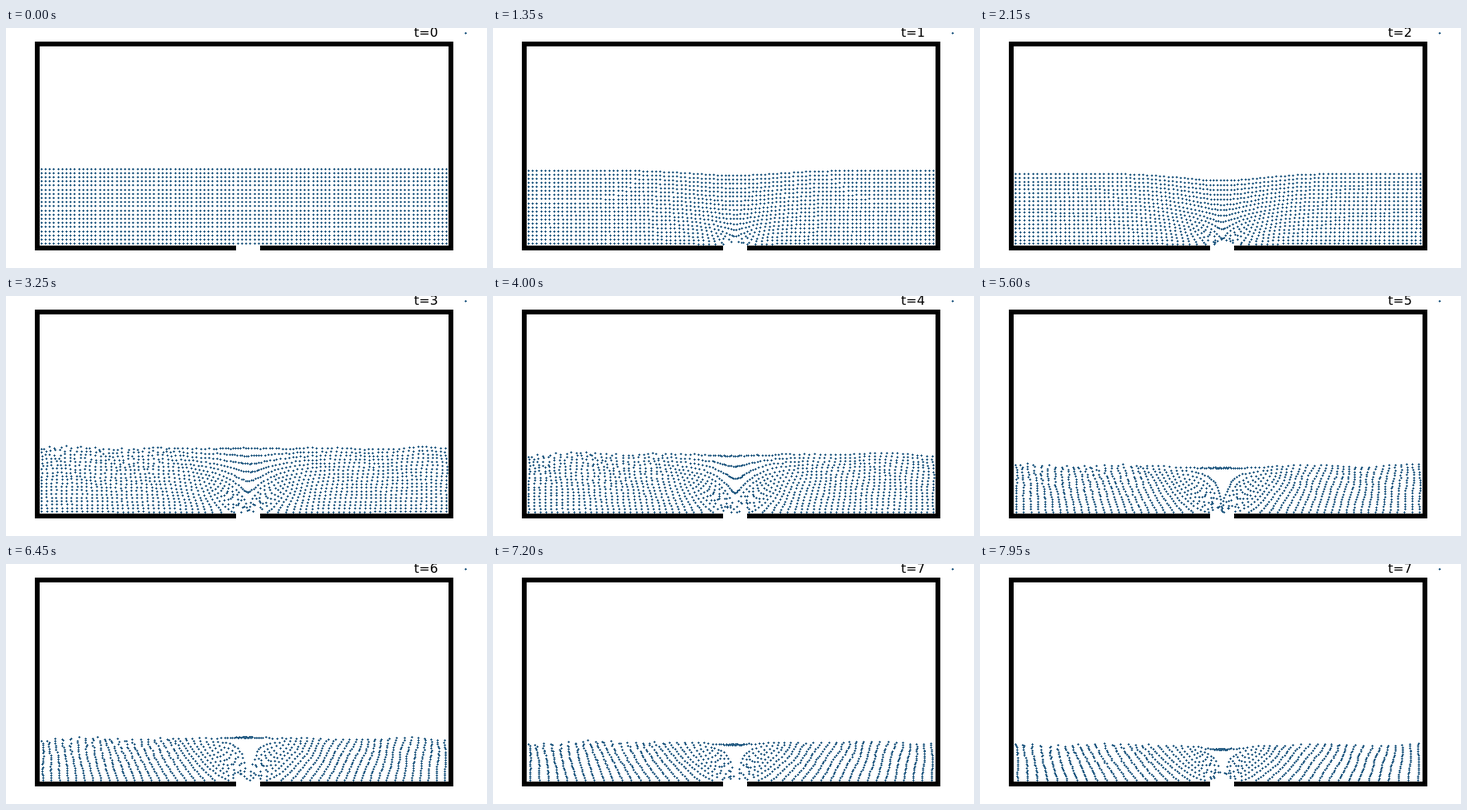
An HTML page with a canvas for the animation above (8000 ms loop, 600x300 px).

```html
<!DOCTYPE html>
<html lang="en">
<head>
<meta charset="utf-8">
<title>Draining tank</title>
<style>
  html, body { margin: 0; width: 100%; height: 100%; overflow: hidden; background: #fff; }
  canvas { display: block; }
</style>
</head>
<body>
<canvas id="stage" width="600" height="300"></canvas>
<script>
const ctx = document.getElementById('stage').getContext('2d');
const LOOP = 8000, STEP = 50, FRAMES = LOOP / STEP, SUBSTEPS = 3;
const LEFT = 42, RIGHT = 552, WIDTH = RIGHT - LEFT, MIDDLE = (LEFT + RIGHT) / 2;
const FLOOR = 271, SINK = 302, SINKS = [-9, 0, 9];

// Wall centre lines span a lattice of 100 by 50 points; water fills the lower inner rows
const WALL_X = 39, WALL_Y = 275, DX = 516 / 99, DY = 255 / 49, COLS = 98, ROWS = 19;
const FULL = FLOOR - (WALL_Y - ROWS * DY);

const clamp = (v, lo, hi) => Math.min(hi, Math.max(lo, v));
const gauss = v => Math.exp(-v * v / 2);

// Mean depth of the water after t seconds
const depthAt = t => FULL - 55 * (1 - Math.exp(-Math.pow(t / 5.4, 2.3)));

// How strongly the water is stirred up, from 0 to 1
const stirAt = t => clamp((t - 2.3) / .9, 0, 1);

// Height of the surface over the mean: a pulsing dip above the outlet, waves from the walls
function surfaceWave(x, t) {
  const pulse = 4.5 * Math.cos(2 * Math.PI * (t - 1.95) / 2.95);
  const dip = Math.min(1, t / 1.3) * (5.5 - .5 * t + pulse) * gauss((x - SINK) / (60 - 4 * t));
  const wall = Math.min(x - LEFT, RIGHT - x);
  const wave = 2.5 * stirAt(t) * Math.cos(wall / 20 - 2.27 * t + 5.7) * Math.exp(-wall / 120);
  return wave - dip;
}

let seed = 7;
function random() {
  seed = (seed * 16807) % 2147483647;
  return seed / 2147483647;
}

function makeParticles() {
  const list = [];
  for (let r = 1; r <= ROWS; r++)
    for (let c = 1; c <= COLS; c++)
      list.push({
        x: WALL_X + c * DX, h: FLOOR - WALL_Y + r * DY,
        jx: random() * 2 - 1, jy: random() * 2 - 1
      });
  return list;
}

// Potential flow in a strip: sinks in the floor below an evenly falling surface.
// Returns whether the particle is still in the tank.
function advect(p, depth, fall) {
  const rate = fall / depth, pull = WIDTH * rate / 2 / SINKS.length;
  const angle = Math.PI * p.h / depth, sin = Math.sin(angle), cos = Math.cos(angle);
  let u = rate * (p.x - MIDDLE), v = -rate * p.h;
  for (const offset of SINKS) {
    const dx = p.x - SINK - offset;
    if (dx * dx + p.h * p.h < 12) return false;
    const a = Math.PI * dx / depth, d = Math.cosh(a) - cos;
    u -= pull * Math.sinh(a) / d;
    v -= pull * sin / d;
  }
  const shear = 1 + .15 * (1 - 2 * p.h / depth);
  p.x = clamp(p.x + u * shear, LEFT + 2, RIGHT - 2);
  p.h += v;
  return p.h > 0;
}

function place(p, t) {
  const depth = depthAt(t), level = clamp(p.h / depth, 0, 1), stir = stirAt(t);
  const rough = stir * (p.x < 215 ? 1.3 : .6);
  const sway = stir * 1.5 * Math.sin(p.x / 13 + p.h / 8 + t);
  const x = p.x + (sway + rough * p.jx) * level;
  const h = p.h + (surfaceWave(p.x, t) + rough * p.jy) * level;
  return [clamp(x, LEFT + 2, RIGHT - 2), FLOOR - h];
}

function simulate() {
  let particles = makeParticles();
  const frames = [], dt = STEP / 1000 / SUBSTEPS;
  for (let f = 0; f < FRAMES; f++) {
    const t = f * STEP / 1000;
    frames.push(particles.map(p => place(p, t)));
    for (let s = 0; s < SUBSTEPS; s++) {
      const depth = depthAt(t + s * dt), fall = depth - depthAt(t + (s + 1) * dt);
      particles = particles.filter(p => advect(p, depth, fall));
    }
  }
  return frames;
}

function dot(x, y) {
  x = Math.floor(x);
  y = Math.floor(y);
  ctx.fillStyle = '#2d6288';
  ctx.fillRect(x - 1, y, 3, 1);
  ctx.fillRect(x, y - 1, 1, 3);
  ctx.fillStyle = '#174f78';
  ctx.fillRect(x, y, 1, 1);
}

function draw(frame, ms) {
  ctx.fillStyle = '#fff';
  ctx.fillRect(0, 0, 600, 300);
  ctx.fillStyle = '#000';
  ctx.fillRect(36, 17, 522, 6);
  ctx.fillRect(36, 17, 6, 261);
  ctx.fillRect(552, 17, 6, 261);
  ctx.fillRect(36, 272, 251, 6);
  ctx.fillRect(317, 272, 241, 6);
  ctx.font = '16px "DejaVu Sans", sans-serif';
  ctx.fillText('t=' + Math.floor(ms / 1000), 509, 11);
  dot(573, 6);
  for (const [x, y] of frame) dot(x, y);
}

const frames = simulate();
const start = performance.now();
let shown = -1;

function tick() {
  const i = Math.floor(((performance.now() - start) % LOOP) / STEP);
  if (i !== shown) draw(frames[i], i * STEP);
  shown = i;
  requestAnimationFrame(tick);
}
tick();
</script>
</body>
</html>
```
